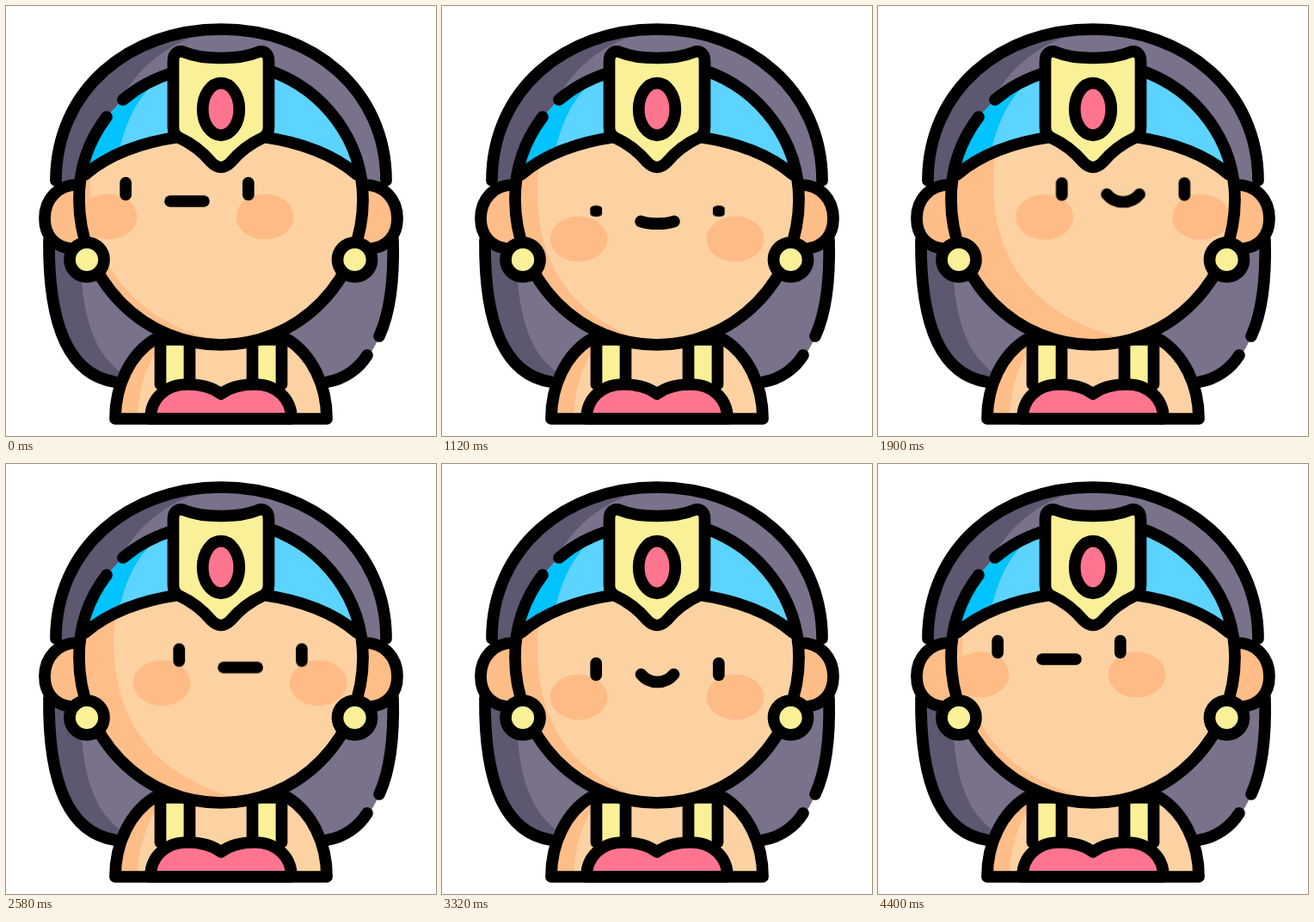
These frames come from a looping animation (500 px wide and 500 px high, 4500 ms). An HTML page:

```html
<!DOCTYPE html>
<html lang="en">
<head>
<meta charset="utf-8">
<title>Princess looking around</title>
<style>
  html, body { margin: 0; width: 100%; height: 100%; overflow: hidden; background: #fff; }
  svg { display: block; width: 100vw; height: 100vh; }
  .line { fill: none; stroke: #000; stroke-width: 13.7; stroke-linecap: round; stroke-linejoin: round; }
  .skin { fill: #fdd2a3; }
  .shade { fill: #ffbd88; }
  .blush { fill: #ffbb86; }
  .gold { fill: #f9f097; }
  .pink { fill: #ff748f; }
  .hair { fill: #7a718a; }
  .hair-dark { fill: #5e5770; }

  .look, .light, .eye, .mouth { animation: 4500ms linear infinite; }
  .look { animation-name: look; }
  .light { animation-name: light; }
  .eye { transform-box: fill-box; transform-origin: center; animation-name: blink; }
  .eye.wink { animation-name: blink-wink; }
  .mouth { animation-name: mouth; }

  @keyframes look {
    0%, 11.11% { transform: translate(-40px, -26px); animation-timing-function: cubic-bezier(.3, 0, 0, 1); }
    22.67%, 32.89% { transform: none; animation-timing-function: cubic-bezier(.3, 0, 0, 1); }
    44.44%, 55.11% { transform: translate(35px, -26px); animation-timing-function: cubic-bezier(.3, 0, 0, 1); }
    66.44%, 86.22% { transform: none; animation-timing-function: cubic-bezier(.3, 0, 0, 1); }
    97.78%, 100% { transform: translate(-40px, -26px); }
  }
  @keyframes light {
    0%, 11.11% { transform: translate(-13px, -8px); animation-timing-function: cubic-bezier(.3, 0, 0, 1); }
    22.67%, 32.89% { transform: none; animation-timing-function: cubic-bezier(.3, 0, 0, 1); }
    44.44%, 55.11% { transform: translate(23px, -12px); animation-timing-function: cubic-bezier(.3, 0, 0, 1); }
    66.44%, 86.22% { transform: none; animation-timing-function: cubic-bezier(.3, 0, 0, 1); }
    97.78%, 100% { transform: translate(-13px, -8px); }
  }
  @keyframes blink {
    0%, 23.33%, 28.89%, 45.11%, 48.89%, 100% { transform: none; }
    26%, 47% { transform: scaleY(.1); }
  }
  @keyframes blink-wink {
    0%, 23.33%, 28.89%, 45.11%, 48.89%, 68.67%, 73.78%, 100% { transform: none; }
    26%, 47%, 71.11% { transform: scaleY(.1); }
  }
  @keyframes mouth {
    0%, 23.33%, 48.89%, 58.5%, 91.5%, 100% { d: path("M231 253C241 253 260 253 270 253"); }
    28.67%, 45.11%, 64%, 86.4% { d: path("M231.5 244.5C241 256.5 260 256.5 269.5 244.5"); }
  }
</style>
</head>
<body>
<svg viewBox="0 0 500 500" xmlns="http://www.w3.org/2000/svg">
  <defs>
    <path id="hair" d="M58 203C58 98 143 27 250 27S442 98 442 203L450 272C451 370 428 428 374 437H126C72 428 49 370 50 272Z"/>
    <path id="face" d="M85 225A165 160 0 0 1 415 225A165 169 0 0 1 85 225Z"/>
    <path id="band" d="M85 225A165 160 0 0 1 415 225L408 196C380 172 340 158 297 152H203C160 158 120 172 92 196Z"/>
    <path id="ear" d="M96 208H83C60 208 45 225 45 247C45 268 58 280 75 282L100 284"/>
    <path id="bust" d="M168 480C168 457 185 440 211 440C229 440 242 445 250 451C258 445 271 440 289 440C315 440 332 457 332 480Z"/>
    <path id="body" d="M172 388C145 405 127 440 127 480H373C373 440 355 405 328 388Z"/>
    <clipPath id="in-hair"><use href="#hair"/></clipPath>
    <clipPath id="in-face"><use href="#face"/></clipPath>
    <clipPath id="in-band"><use href="#band"/></clipPath>
    <clipPath id="in-body"><use href="#body"/></clipPath>
  </defs>

  <!-- hair -->
  <use href="#hair" class="hair"/>
  <g clip-path="url(#in-hair)" class="hair-dark">
    <path d="M0 0H250L240 30C165 45 112 110 110 200V230H0Z"/>
    <path d="M0 230H87V285C86 370 109 428 163 437V450H0Z"/>
  </g>
  <path class="line" d="M58 203C58 98 143 27 250 27S442 98 442 203M50 272C49 370 72 428 126 437M450 272Q452 345 434 384M420 406C410 422 393 434 374 437"/>

  <!-- body -->
  <use href="#body" class="skin"/>
  <path class="shade" clip-path="url(#in-body)" d="M110 380H190C167 408 153 440 153 485H110Z"/>
  <path class="gold" d="M180 380H213V460H180ZM287 380H320V460H287Z"/>
  <path class="line" d="M179.5 385V440M213.5 385V434M286.5 385V434M320.5 385V440"/>
  <use href="#bust" class="pink"/>
  <use href="#bust" class="line"/>
  <use href="#body" class="line"/>

  <!-- ears -->
  <g id="one-ear">
    <use href="#ear" class="shade"/>
    <use href="#ear" class="line"/>
  </g>
  <use href="#one-ear" transform="matrix(-1 0 0 1 500 0)"/>

  <!-- face -->
  <g clip-path="url(#in-face)">
    <use href="#face" class="shade"/>
    <path class="skin light" d="M160 100C125 130 111 175 111 215C111 300 150 365 250 395L300 415H500V100Z"/>
    <g class="look">
      <ellipse class="blush" cx="159" cy="271" rx="33.5" ry="26.5"/>
      <ellipse class="blush" cx="341" cy="271" rx="33.5" ry="26.5"/>
      <path class="line eye wink" d="M179.2 231.5V245.5"/>
      <path class="line eye" d="M321.8 231.5V245.5"/>
      <path class="line mouth" d="M231 253C241 253 260 253 270 253"/>
    </g>
  </g>

  <!-- headband -->
  <use href="#band" fill="#5cd4ff"/>
  <path clip-path="url(#in-band)" fill="#00c3ff" d="M60 60H195L190 79C160 92 138 130 130 178V230H60Z"/>
  <path class="line" d="M92 196C120 172 160 158 203 152M408 196C380 172 340 158 297 152"/>
  <path class="line" d="M117 129A165 160 0 0 0 85 225A165 169 0 0 0 415 225A165 160 0 0 0 306 75M136 109Q162 87 196 77"/>

  <!-- crown -->
  <path class="line gold" style="fill:#f9f097" d="M194.5 64C194.5 54 201 51 208 54C220 59 235 60.5 250 60.5S280 59 292 54C299 51 305.5 54 305.5 64V141Q305.5 149 299 153Q277 163 261 182Q250 193 239 182Q223 163 201 153Q194.5 149 194.5 141Z"/>
  <ellipse class="line" style="fill:#ff748f" cx="250" cy="120" rx="21.3" ry="30.3"/>

  <!-- earrings -->
  <circle class="line" style="fill:#f9f097" cx="94" cy="295" r="20"/>
  <circle class="line" style="fill:#f9f097" cx="405.5" cy="295" r="20"/>
</svg>
</body>
</html>
```
